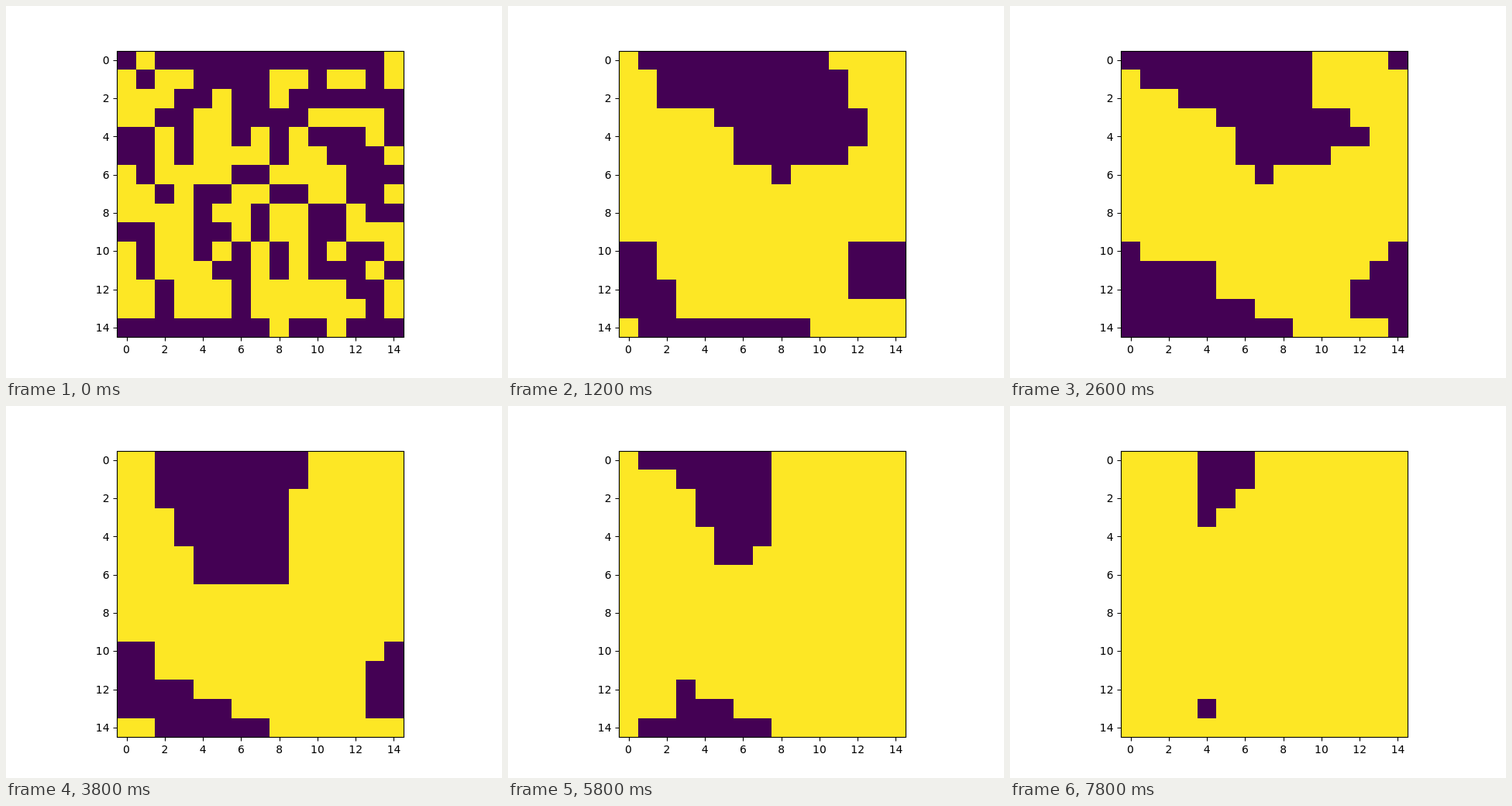
Recreate the animation shown at these times as an HTML page. Size 640x480 px, loop 8000 ms.

```html
<!DOCTYPE html>
<html lang="en">
<head>
<meta charset="utf-8">
<title>Spin lattice</title>
<style>
  html, body { margin: 0; width: 100%; height: 100%; overflow: hidden; background: #fff; }
  svg { display: block; width: 100vw; height: 100vh; }
  text { font: 13.89px "DejaVu Sans", sans-serif; }
</style>
</head>
<body>
<svg id="stage" viewBox="0 0 640 480">
  <rect width="640" height="480" fill="#fff"/>
  <rect x="143" y="58" width="371" height="370" fill="#fde725"/>
  <path id="dark" fill="#440154" shape-rendering="crispEdges"/>
  <rect x="143.5" y="58.5" width="370" height="369" fill="none" stroke="#000" stroke-width="1.11"/>
  <path id="ticks" stroke="#000" stroke-width="1.11"/>
  <g id="labels"></g>
</svg>
<script>
const N = 15, CELL = 24.64, LEFT = 143.2, TOP = 57.6;
const STEP_MS = 200, STEPS = 40;
const $ = id => document.getElementById(id);
const px = i => Math.round(LEFT + i * CELL);
const py = i => Math.round(TOP + i * CELL);

// Outlines of the dark domains, in cell units
const poses = [
  { step: 0, d: 'M2 0H14V2H15V5H14V3H10V4H9V6H8V4H7V5H6V2H5V3H4V6H3V4H2V3H3V2H4V1H2Z' +
    'M11 1h2v1h-2zM8 1h2v1h-1v1h-1zM0 0h1v1h-1zM1 1h1v1h-1z' +
    'M0 4H2V7H1V6H0ZM2 7h1v1h-1zM6 6h2v1h-2zM8 7h2v1h-2z' +
    'M10 4H13V5H14V6H15V7H14V8H15V9H13V8H12V6H11V5H10Z' +
    'M4 7H6V8H5V9H6V10H5V11H4ZM7 8h1v2h-1z' +
    'M10 8H12V10H11V11H12V10H14V11H13V12H14V14H15V15H12V14H13V13H12V12H10Z' +
    'M14 11h1v1h-1zM0 9H2V12H1V10H0Z' +
    'M6 10H7V14H8V15H0V14H2V12H3V14H6V12H5V11H6ZM8 10h1v2h-1zM9 14h2v1h-2z' },
  { step: 6, d: 'M1 0H11V1H12V3H13V5H12V6H9V7H8V6H6V4H5V3H2V1H1Z' +
    'M0 10H2V12H3V14H10V15H1V14H0ZM12 10h3v3h-3z' },
  { step: 13, d: 'M0 0H10V3H12V4H13V5H11V6H8V7H7V6H6V4H5V3H3V2H1V1H0ZM14 0h1v1h-1z' +
    'M0 10H1V11H5V13H7V14H9V15H0ZM14 10H15V15H14V14H12V12H13V11H14Z' },
  { step: 19, d: 'M2 0H10V2H9V7H4V5H3V3H2Z' +
    'M0 10H2V12H4V13H6V14H8V15H2V14H0ZM14 10H15V14H13V11H14Z' },
  { step: 25, d: 'M3 0H8V1H9V4H8V5H7V6H5V4H4V2H3ZM1 11H2V12H4V13H6V14H8V15H1Z' },
  { step: 33, d: 'M1 0H7V6H5V4H4V3H3V1H1ZM4 13H6V14H7V15H1V14H4Z' },
  { step: 39, d: 'M4 0H7V2H6V3H5V4H4ZM4 13h1v1h-1z' }
];

const ctx = document.createElement('canvas').getContext('2d');
const cells = Array.from({ length: N * N }, (_, i) => ({ i, x: i % N, y: Math.floor(i / N) }));
for (const p of poses) {
  const path = new Path2D(p.d);
  p.grid = cells.map(c => ctx.isPointInPath(path, c.x + 0.5, c.y + 0.5, 'evenodd'));
}

const wrap = v => (v + N) % N;
const noise = i => { const s = Math.sin(i * 12.9898 + 4.1) * 43758.5453; return s - Math.floor(s); };

// How strongly the periodic neighbourhood pulls a cell towards spin s
function pull(grid, c, s) {
  let sum = 0;
  for (let dy = -2; dy <= 2; dy++)
    for (let dx = -2; dx <= 2; dx++)
      if (grid[wrap(c.y + dy) * N + wrap(c.x + dx)] === s) sum += 1 / (1 + dx * dx + dy * dy);
  return sum;
}

// Order in which spins flip on the way from one pose to the next
for (let k = 0; k < poses.length - 1; k++) {
  const a = poses[k], b = poses[k + 1];
  const bias = k >= 3 ? 2 : 0;
  a.flips = cells.filter(c => a.grid[c.i] !== b.grid[c.i])
    .map(c => ({ i: c.i, score: pull(a.grid, c, b.grid[c.i]) + noise(c.i) + bias * Math.abs(c.x - 5) }))
    .sort((p, q) => q.score - p.score);
}

function gridAt(step) {
  let k = poses.length - 1;
  while (poses[k].step > step) k--;
  const a = poses[k], grid = a.grid.slice();
  if (a.step === step) return grid;
  const u = (step - a.step) / (poses[k + 1].step - a.step);
  const done = k === 0 ? 1 - (1 - u) ** 3 : u;
  const count = Math.round(done * a.flips.length);
  for (const f of a.flips.slice(0, count)) grid[f.i] = !grid[f.i];
  return grid;
}

const cellPath = c => `M${px(c.x)} ${py(c.y)}H${px(c.x + 1)}V${py(c.y + 1)}H${px(c.x)}Z`;
const frames = Array.from({ length: STEPS }, (_, s) => {
  const grid = gridAt(s);
  return cells.filter(c => grid[c.i]).map(cellPath).join('');
});

function drawAxes() {
  let ticks = '', labels = '';
  for (let v = 0; v < N; v += 2) {
    const x = LEFT + (v + 0.5) * CELL, y = TOP + (v + 0.5) * CELL;
    ticks += `M${Math.round(x) + 0.5} 427.5v5M143.5 ${Math.round(y) + 0.5}h-5`;
    labels += `<text x="${x}" y="448" text-anchor="middle">${v}</text>` +
      `<text x="133.5" y="${Math.round(y + 5.07)}" text-anchor="end">${v}</text>`;
  }
  $('ticks').setAttribute('d', ticks);
  $('labels').innerHTML = labels;
}

let shown = -1;
function draw(ms) {
  const step = Math.floor(ms / STEP_MS) % STEPS;
  if (step !== shown) $('dark').setAttribute('d', frames[shown = step]);
}

drawAxes();
draw(0);
const start = performance.now();
(function tick() {
  draw(performance.now() - start);
  requestAnimationFrame(tick);
})();
</script>
</body>
</html>
```
